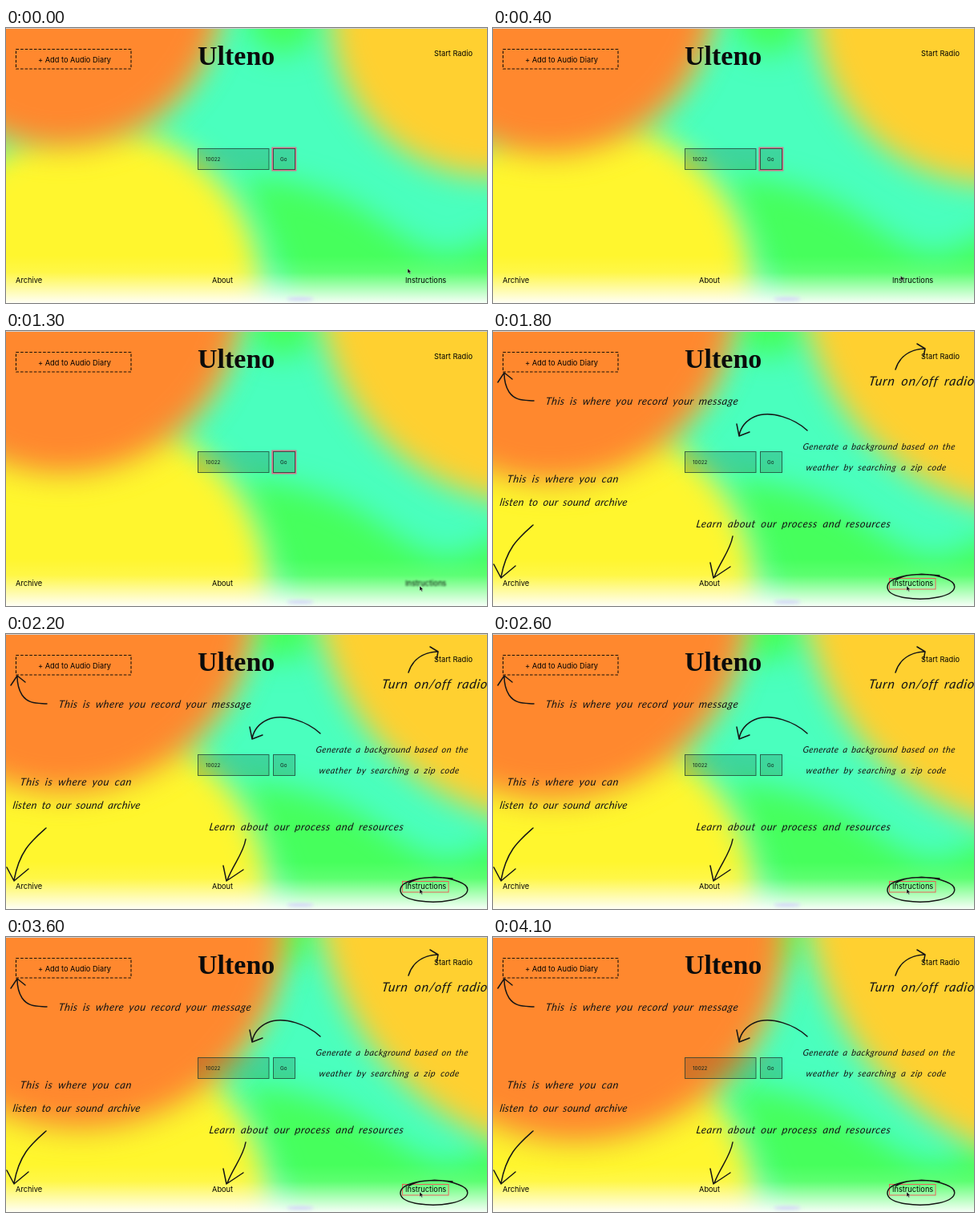
Write an HTML page that moves like this. It is 600 px wide and 343 px high and loops after 4.2 s.

```html
<!DOCTYPE html>
<html lang="en">
<head>
<meta charset="utf-8">
<title>Audio diary</title>
<style>
  html, body { margin: 0; width: 100%; height: 100%; overflow: hidden; background: #fff; }
  svg { display: block; width: 600px; height: 343px; }
  .ui { font: 9.25px Inter, Arial, sans-serif; fill: #000; }
  .small { font: 6.4px Inter, Arial, sans-serif; fill: #12251f; }
  .title { font: bold 34px "Liberation Serif", Times, serif; fill: #0b0b0b; }
  .hand { font-family: Lato, sans-serif; font-style: italic; fill: #141414; }
  .ink { fill: none; stroke: #151515; stroke-width: 1.5; stroke-linecap: round; stroke-linejoin: round; }
  .field { fill: #000; fill-opacity: .16; stroke: #1c3a30; stroke-opacity: .75; }
</style>
</head>
<body>
<svg viewBox="0 0 600 343" xmlns="http://www.w3.org/2000/svg">
  <defs>
    <filter id="soft" filterUnits="userSpaceOnUse" x="-60" y="-60" width="720" height="463" color-interpolation-filters="sRGB">
      <feGaussianBlur stdDeviation="18"/>
    </filter>
    <filter id="haze" filterUnits="userSpaceOnUse" x="330" y="320" width="80" height="40">
      <feGaussianBlur stdDeviation="2"/>
    </filter>
    <filter id="fuzz" filterUnits="userSpaceOnUse" x="480" y="300" width="90" height="30">
      <feGaussianBlur stdDeviation=".8"/>
    </filter>
    <linearGradient id="fade" x1="0" y1="0" x2="0" y2="1">
      <stop offset="0" stop-color="#fff" stop-opacity="0"/>
      <stop offset=".35" stop-color="#fff" stop-opacity=".12"/>
      <stop offset=".7" stop-color="#fff" stop-opacity=".57"/>
      <stop offset="1" stop-color="#fff" stop-opacity=".95"/>
    </linearGradient>
  </defs>

  <rect width="600" height="343" fill="#4affbe"/>
  <g filter="url(#soft)" fill="#46ff5c">
    <path d="M295 185 C345 186 400 202 440 224 C480 248 510 278 550 282 C580 280 610 255 660 235 V420 H365 C358 330 325 260 295 185 Z"/>
    <circle cx="345" cy="-12" r="44"/>
  </g>
  <g filter="url(#soft)"><circle id="amber" fill="#ffd030"/></g>
  <g filter="url(#soft)"><circle id="yellow" fill="#fff62e"/></g>
  <g filter="url(#soft)"><circle id="rim" fill="#d8ff40" opacity=".4"/></g>
  <g filter="url(#soft)"><circle id="orange" fill="#ff882e"/></g>
  <rect y="284" width="600" height="59" fill="url(#fade)"/>
  <ellipse cx="367" cy="338" rx="17" ry="2" fill="#d3d0fa" filter="url(#haze)"/>
  <rect width="600" height="1" fill="#cfd0d2"/>

  <rect x="12.5" y="26.5" width="143.5" height="24.5" fill="none" stroke="#1a1208" stroke-width="1.1" stroke-dasharray="3.6 2"/>
  <text class="ui" x="40" y="43">+ Add to Audio Diary</text>
  <text class="title" x="239" y="46">Ulteno</text>
  <text class="ui" x="534" y="35">Start Radio</text>

  <rect class="field" x="239.5" y="150.5" width="88.5" height="26"/>
  <text class="small" x="249" y="166">10022</text>
  <rect id="ring" x="332.5" y="149.7" width="28.7" height="27.6" fill="none" stroke="#d0788e" stroke-width="2.4"/>
  <rect class="field" x="333.5" y="150.5" width="27" height="26"/>
  <text class="small" x="342" y="166">Go</text>

  <text class="ui" x="12" y="318">Archive</text>
  <text class="ui" x="257" y="318">About</text>
  <text class="ui" id="help" x="498" y="318">Instructions</text>

  <g id="notes">
    <rect x="494.5" y="308.5" width="57.5" height="13.5" fill="none" stroke="#e8605a"/>
    <g id="words"></g>
    <g class="ink">
      <path d="M51 87 C40 86 28 88 20 76 C15 68 14 60 14 53 M6 64 L14 52 L24 60"/>
      <path d="M502 48 C507 32 520 23 538 22 M529 16 L539 22 L537 32"/>
      <path d="M392 124 C377 110 347 98 326 107 C315 112 309 121 307 130 M304 116 L307 131 L320 126"/>
      <path d="M50 242 C32 258 17 270 10 307 M1 291 L10 308 L28 293"/>
      <path d="M299 256 C296 274 283 288 276 307 M271 289 L275 308 L296 294"/>
      <path d="M557 305 C520 300 491 308 492 320 C493 333 530 337 555 332 C580 327 581 315 565 309 C545 301 514 302 502 311"/>
    </g>
  </g>
  <path id="cursor" d="M0 0 V6 L1.5 4.8 L2.6 7 L3.6 6.5 L2.6 4.4 L4.4 4.2 Z" fill="#111" stroke="#fff" stroke-width=".5" stroke-opacity=".6"/>
</svg>
<script>
const LOOP = 4200, STEP = 100, HOVER = 500, CLICK = 1500;
const el = id => document.getElementById(id);

// x, baseline, size, letter gap, word gap, text
const notes = [
  [65, 92, 13, .5, 3, "This is where you record your message"],
  [468, 68, 16, .85, 3, "Turn on/off radio"],
  [386, 148, 11, .39, 2, "Generate a background based on the"],
  [390, 174, 11, .52, 3, "weather by searching a zip code"],
  [17, 189, 13, .65, 3, "This is where you can"],
  [8, 218, 13, .22, 3, "listen to our sound archive"],
  [253, 245, 13, .59, 3, "Learn about our process and resources"]
];
for (const [x, y, size, gap, space, text] of notes) {
  const node = document.createElementNS("http://www.w3.org/2000/svg", "text");
  node.setAttribute("class", "hand");
  node.setAttribute("transform", `translate(${x} ${y}) skewX(-9)`);
  node.style.cssText = `font-size:${size}px;letter-spacing:${gap}px;word-spacing:${space}px`;
  node.textContent = text;
  el("words").append(node);
}

// Keys: time, then centre x, centre y, radius
const blobs = {
  orange: [[0, 70, -50, 198], [2600, 72, -38, 244], [4100, 102, -5, 260]],
  yellow: [[0, 110, 330, 208], [800, 105, 322, 222], [4100, 100, 345, 228]],
  amber: [[0, 605, -15, 200], [1800, 690, -80, 308], [4100, 760, -80, 374]]
};
const pointer = [[0, 501, 300], [200, 501, 300], [600, 516, 318]];

function at(keys, t) {
  let i = 0;
  while (i < keys.length - 2 && t > keys[i + 1][0]) i++;
  const a = keys[i], b = keys[i + 1];
  const k = Math.min(1, (t - a[0]) / (b[0] - a[0]));
  return a.slice(1).map((v, n) => v + (b[n + 1] - v) * k);
}

function place(id, [x, y, r], grow = 0) {
  const c = el(id);
  c.setAttribute("cx", x);
  c.setAttribute("cy", y);
  c.setAttribute("r", r + grow);
}

function draw(t) {
  for (const id in blobs) place(id, at(blobs[id], t));
  place("rim", at(blobs.orange, t), 6);

  const open = t >= CLICK, hover = t >= HOVER && !open;
  el("notes").style.display = open ? "" : "none";
  el("ring").style.display = open ? "none" : "";
  if (hover) el("help").setAttribute("filter", "url(#fuzz)");
  else el("help").removeAttribute("filter");
  el("cursor").setAttribute("transform", `translate(${at(pointer, t)})`);
}

let last = -1;
function tick(now) {
  const t = Math.floor((now % LOOP) / STEP) * STEP;
  if (t !== last) draw(last = t);
  requestAnimationFrame(tick);
}
draw(0);
requestAnimationFrame(tick);
</script>
</body>
</html>
```
